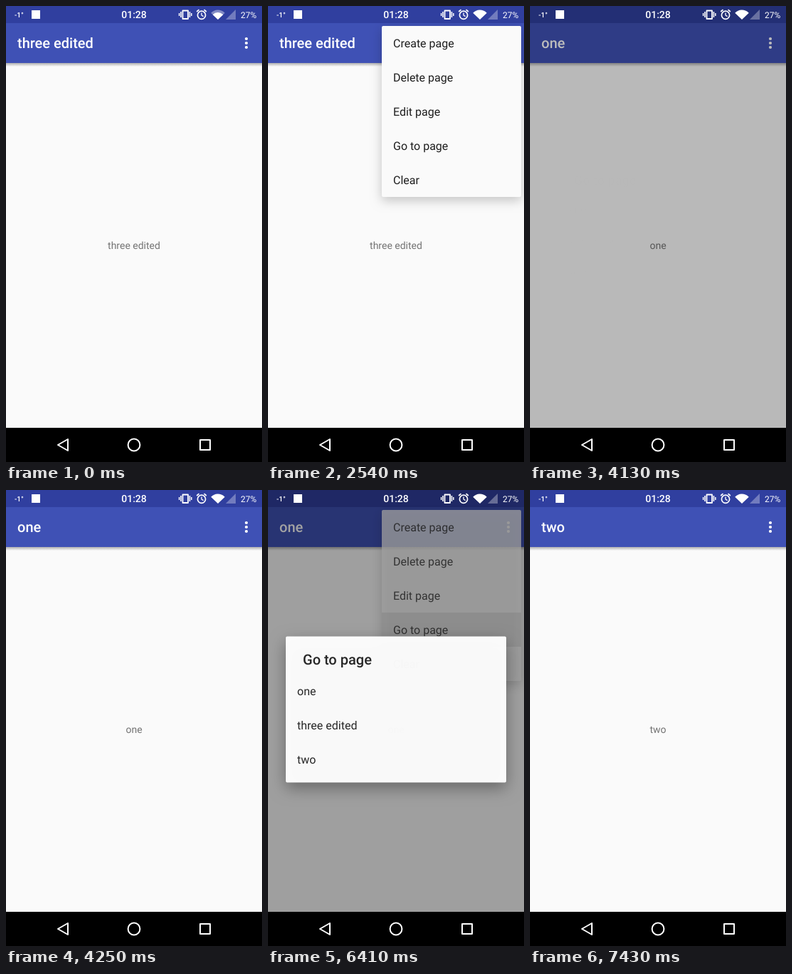
Recreate the animation shown at these times as an HTML page with a canvas. Size 360 by 640 pixels, loop 8000 ms.

```html
<!DOCTYPE html>
<html lang="en">
<head>
<meta charset="utf-8">
<title>Page menu</title>
<style>
html, body { margin: 0; width: 100%; height: 100%; overflow: hidden; background: #000; }
canvas { display: block; width: 360px; height: 640px; }
</style>
</head>
<body>
<canvas id="stage" width="360" height="640"></canvas>
<script>
const ctx = document.getElementById('stage').getContext('2d');
const LOOP = 8000;
const MENU = ['Create page', 'Delete page', 'Edit page', 'Go to page', 'Clear'];
const PAGES = ['one', 'three edited', 'two'];
const WHITE = '#fff', INK = '#1e1e1e', PAPER = '#fafafa';

// Each visit: press the overflow button, press "Go to page", press a row.
const VISITS = [
  { press: 1020, choose: 2540, dialog: 2790, pick: 3870, close: 3990, row: 0 },
  { press: 4950, choose: 6160, dialog: 6290, pick: 6920, close: 7180, row: 2 }
];
const MENU_DELAY = 145, FADE = 250;
const BOX = { x: 160, y: 28, w: 196, h: 240 };
const DIALOG = { x: 25, y: 205.5, w: 310, h: 205 };

const clamp = v => Math.max(0, Math.min(1, v));
const progress = (t, start, length) => clamp((t - start) / length);
const easeOut = (u, power) => 1 - Math.pow(1 - u, power);

// cubic-bezier(.4, 0, .2, 1)
function fastOutSlowIn(x) {
  let lo = 0, hi = 1, s = 0.5;
  for (let i = 0; i < 24; i++) {
    s = (lo + hi) / 2;
    const bx = 1.2 * s * (1 - s) ** 2 + 0.6 * s * s * (1 - s) + s ** 3;
    if (bx < x) lo = s; else hi = s;
  }
  return 3 * s * s * (1 - s) + s ** 3;
}

function scoped(draw) {
  ctx.save();
  draw();
  ctx.restore();
}

function text(str, x, y, size, color, weight = 400, align = 'left') {
  ctx.font = `${weight} ${size}px Roboto, sans-serif`;
  ctx.textRendering = 'geometricPrecision';
  ctx.textAlign = align;
  ctx.fillStyle = color;
  ctx.fillText(str, x, y);
}

function rect(x, y, w, h, color) {
  ctx.fillStyle = color;
  ctx.fillRect(x, y, w, h);
}

function disc(x, y, r, color) {
  ctx.fillStyle = color;
  ctx.beginPath();
  ctx.arc(x, y, r, 0, Math.PI * 2);
  ctx.fill();
}

function line(points, color, width, closed) {
  ctx.strokeStyle = color;
  ctx.lineWidth = width;
  ctx.beginPath();
  points.forEach(([x, y]) => ctx.lineTo(x, y));
  if (closed) ctx.closePath();
  ctx.stroke();
}

function card(x, y, w, h, color, blur, drop, shade) {
  scoped(() => {
    ctx.shadowColor = `rgba(0,0,0,${shade})`;
    ctx.shadowBlur = blur;
    ctx.shadowOffsetY = drop;
    ctx.fillStyle = color;
    ctx.beginPath();
    ctx.roundRect(x, y, w, h, 2);
    ctx.fill();
  });
}

// Touch feedback clipped to a row.
function rowRipple(t, start, cx, x, y, w, h) {
  const u = progress(t, start, 300);
  if (u <= 0) return;
  scoped(() => {
    ctx.beginPath();
    ctx.rect(x, y, w, h);
    ctx.clip();
    rect(x, y, w, h, `rgba(0,0,0,${0.05 * clamp(u * 3)})`);
    disc(cx, y + h / 2, 20 + w * easeOut(u, 2), `rgba(0,0,0,${0.05 * clamp(u * 3)})`);
  });
}

function drawPage(t, title) {
  rect(0, 80, 360, 512, PAPER);
  const g = ctx.createLinearGradient(0, 80, 0, 85);
  g.addColorStop(0, 'rgba(0,0,0,.3)');
  g.addColorStop(1, 'rgba(0,0,0,0)');
  rect(0, 80, 360, 5, g);
  rect(0, 0, 360, 24, '#303f9f');
  rect(0, 24, 360, 56, '#3f51b5');
  text(title, 16, 59, 20, WHITE, 500);
  text(title, 180, 341, 14, 'rgba(0,0,0,.54)', 400, 'center');
  for (const v of VISITS) {
    const u = progress(t, v.press, 160);
    const fade = 1 - progress(t, v.press + 200, 300);
    if (u > 0 && fade > 0)
      disc(338, 52, 6 + 16 * easeOut(u, 2), `rgba(255,255,255,${0.22 * fade})`);
  }
  for (const y of [46, 52, 58]) disc(338, y, 2.1, WHITE);
}

// The menu slides out of its top right corner as its clip grows.
function drawMenu(t, v) {
  const start = v.press + MENU_DELAY;
  const alpha = progress(t, start, 100) * (1 - progress(t, v.dialog, FADE) ** 2);
  if (alpha <= 0) return;
  const rest = 1 - fastOutSlowIn(progress(t, start, 250));
  const dx = rest * BOX.w / 2, dy = -rest * BOX.h / 2;
  const w = BOX.w * (1 - rest), h = BOX.h * (1 - rest);
  const x = BOX.x + BOX.w - w;
  scoped(() => {
    ctx.globalAlpha = alpha;
    card(x, BOX.y, w, h, PAPER, 15, 5, 0.22);
    ctx.beginPath();
    ctx.rect(x, BOX.y, w, h);
    ctx.clip();
    ctx.translate(dx, dy);
    rowRipple(t, v.choose, 235, BOX.x, 172, BOX.w, 48);
    MENU.forEach((label, i) => text(label, 176, 58 + 48 * i, 16, INK));
  });
}

function drawDialog(t, v) {
  const enter = progress(t, v.dialog, 220), exit = progress(t, v.close, 220);
  const alpha = easeOut(progress(t, v.dialog, 150), 2) *
    (1 - easeOut(progress(t, v.close, 150), 2));
  if (alpha <= 0) return;
  const scale = 0.9 + 0.1 * easeOut(enter, 10) - 0.1 * easeOut(exit, 10);
  const { x, y, w, h } = DIALOG;
  scoped(() => {
    ctx.globalAlpha = alpha;
    ctx.translate(180, 308);
    ctx.scale(scale, scale);
    ctx.translate(-180, -308);
    card(x, y, w, h, WHITE, 22, 8, 0.36);
    rowRipple(t, v.pick, 110, x, 259 + 48 * v.row, w, 48);
    text('Go to page', 49, 245, 20, INK, 500);
    PAGES.forEach((label, i) => text(label, 41, 288 + 48 * i, 16, INK));
  });
}

function fan(r, color) {
  const spread = Math.PI * 0.26;
  ctx.fillStyle = color;
  ctx.beginPath();
  ctx.moveTo(298, 19);
  ctx.arc(298, 19, r, -Math.PI / 2 - spread, -Math.PI / 2 + spread);
  ctx.fill();
}

function drawStatus(t) {
  text('-1°', 12, 16, 10, WHITE, 500);
  rect(36, 6, 12, 12, WHITE);
  text('01:28', 180, 17, 14, WHITE, 500, 'center');

  ctx.strokeStyle = WHITE;
  ctx.lineWidth = 1.8;
  ctx.strokeRect(248.5, 6.5, 7.5, 11.5);
  for (const side of [-1, 1]) {
    line([[252.2 + side * 6.2, 8], [252.2 + side * 6.2, 16]], WHITE, 1.6);
    line([[252.2 + side * 8.6, 10], [252.2 + side * 8.6, 14]], WHITE, 1.5);
    line([[275 + side * 3.5, 5.2], [275 + side * 6.8, 8]], WHITE, 1.7);
  }
  ctx.lineWidth = 1.7;
  ctx.beginPath();
  ctx.arc(275, 12.8, 5.6, 0, Math.PI * 2);
  ctx.stroke();
  line([[275, 9.5], [275, 13], [277.6, 14.6]], WHITE, 1.3);

  fan(13.4, t < 630 ? 'rgba(255,255,255,.4)' : WHITE);
  if (t < 630) fan(10, WHITE);
  ctx.fillStyle = 'rgba(255,255,255,.32)';
  ctx.beginPath();
  ctx.moveTo(323, 5);
  ctx.lineTo(323, 19);
  ctx.lineTo(309, 19);
  ctx.fill();
  text('27%', 330, 16.5, 12, WHITE);
}

function drawNav() {
  rect(0, 592, 360, 48, '#000');
  ctx.lineJoin = 'round';
  line([[73, 616], [87, 608], [87, 624]], WHITE, 2, true);
  ctx.beginPath();
  ctx.arc(180, 616, 8.4, 0, Math.PI * 2);
  ctx.stroke();
  ctx.strokeRect(273, 609, 14, 14);
}

function render(t) {
  let title = 'three edited', dim = 0;
  for (const v of VISITS) {
    if (t >= v.close) title = PAGES[v.row];
    dim += 0.6 * (progress(t, v.dialog, 200) - progress(t, v.close, FADE));
  }
  drawPage(t, title);
  VISITS.forEach(v => drawMenu(t, v));
  if (dim > 0) rect(0, 0, 360, 592, `rgba(0,0,0,${dim})`);
  VISITS.forEach(v => drawDialog(t, v));
  drawStatus(t);
  drawNav();
}

const began = performance.now();
function tick() {
  render((performance.now() - began) % LOOP);
  requestAnimationFrame(tick);
}
tick();
</script>
</body>
</html>
```
